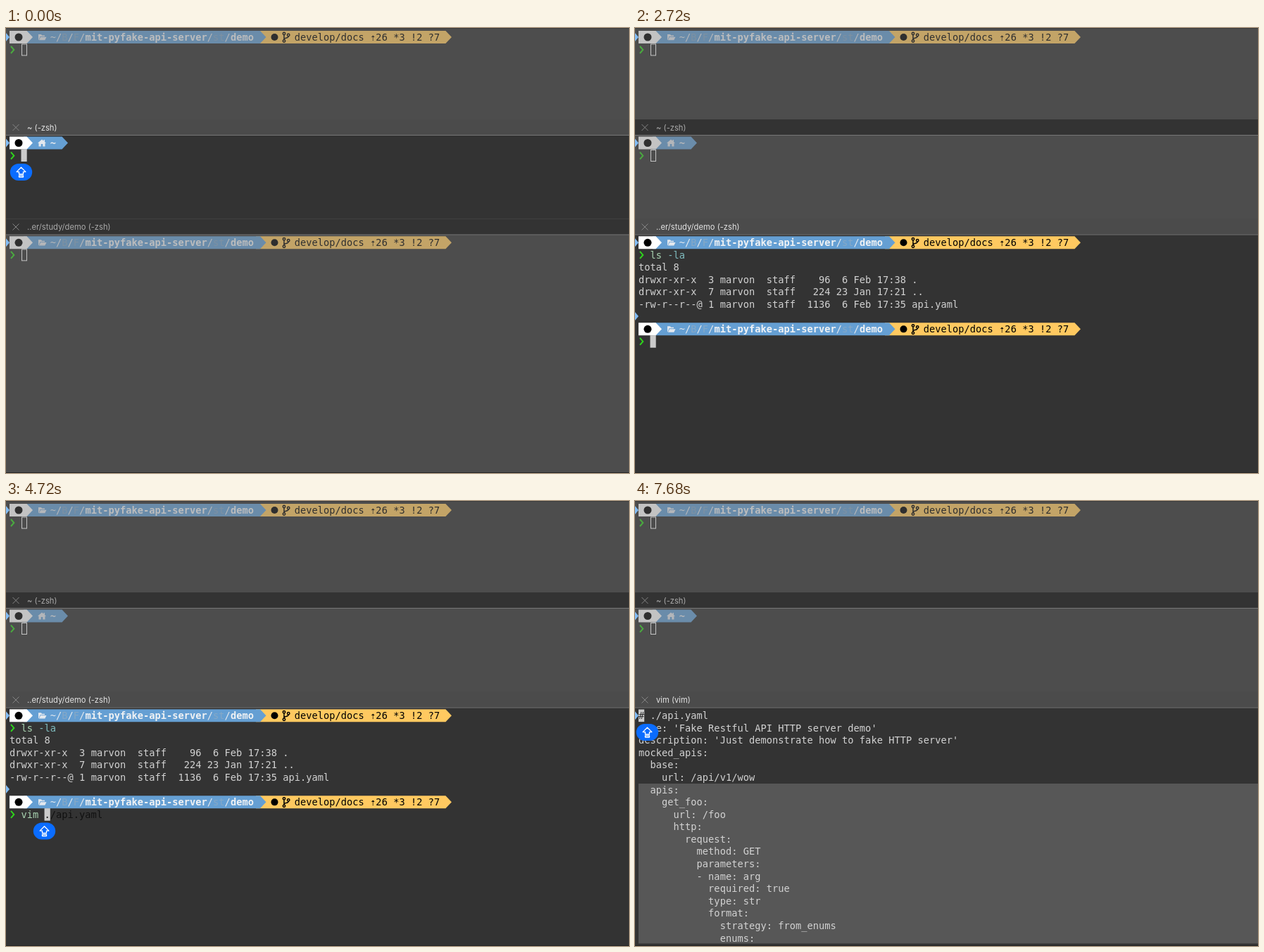
An HTML page for the animation above (8000 ms loop, 885 px wide and 633 px high).

```html
<!DOCTYPE html>
<html lang="en">
<head>
<meta charset="utf-8">
<title>Terminal panes</title>
<style>
  html, body { margin: 0; width: 100%; height: 100%; overflow: hidden; background: #333; }
  svg { display: block; width: 100vw; height: 100vh; }
  text { white-space: pre; font: 13.72px "DejaVu Sans Mono", monospace; fill: #d2d2d2; }
  text.title { font: 11.2px Inter, sans-serif; }
  text.bold { font-weight: 700; }
</style>
</head>
<body>
<svg id="stage" viewBox="0 0 885 633" preserveAspectRatio="none"></svg>
<script>
const LOOP = 8000, STEP = 80;
const CELL = 8.26, LEFT = 5, LINE = 17.58, TOP = 305.3;
const stage = document.getElementById('stage');

const col = n => LEFT + n * CELL;
const row = n => TOP + n * LINE;

function add(parent, tag, attrs = {}, content) {
  const node = document.createElementNS('http://www.w3.org/2000/svg', tag);
  for (const key in attrs) node.setAttribute(key, attrs[key]);
  if (content !== undefined) node.textContent = content;
  return parent.appendChild(node);
}
const group = (parent = stage) => add(parent, 'g');
const rect = (parent, x, y, width, height, fill, more) =>
  add(parent, 'rect', { x, y, width, height, fill, ...more });
const path = (parent, d, fill, more) => add(parent, 'path', { d, fill, ...more });
const dot = (parent, cx, cy, r, more) => add(parent, 'circle', { cx, cy, r, ...more });
const show = (node, on) => { node.style.display = on ? '' : 'none'; };
const move = (node, x, y) => node.setAttribute('transform', `translate(${x} ${y})`);

function write(parent, column, y, content, fill = '#d2d2d2', cls = '') {
  return add(parent, 'text', { x: col(column), y: y + 4.8, class: cls, style: `fill:${fill}` }, content);
}

const arrowBar = (parent, from, to, fill) =>
  path(parent, `M${from}-9H${to}L${to + 8.5} 0L${to} 9H${from}Z`, fill);

const folder = parent => path(parent,
  'M46 4V-4H50L51 -2.5H55V-1H48.5L46.5 4ZM49-.2H57.5L55.3 4.3H47Z', '#e3e8ee');
const house = parent => path(parent,
  'M45 .2L51 -5L53.5 -2.8V-4.5H55V-1.5L57 .2H55.5V5H52.3V1.5H49.7V5H46.5V.2Z', '#e3e8ee');

function branch(parent) {
  const line = { stroke: '#000', 'stroke-width': 1.5 };
  for (const [x, y] of [[395, -5], [395, 5.5], [401.2, -3]]) dot(parent, x, y, 1.7, { fill: 'none', ...line });
  path(parent, 'M395-3V3.7M401.2-1.2C401.2 2 395 .5 395 3', 'none', line);
}

const mark = y => path(stage, `M0 ${y - 6}L5 ${y}L0 ${y + 6}Z`, '#82bcf4');

function prompt(parent, y, home) {
  const g = group(parent);
  move(g, 0, y);
  if (!home) arrowBar(g, 355, 624.5, '#ffc960');
  arrowBar(g, 25, home ? 79.5 : 361, '#659fd3');
  arrowBar(g, 5, 29.5, '#fff');
  dot(g, 18, 0, 5.5, { fill: '#000' });
  if (home) {
    house(g);
    write(g, 7, 0, '~', '#e3e8ee', 'bold');
  } else {
    const light = '#e3e8ee', faded = '#86a8c6';
    folder(g);
    const parts = [['~/', light], ['B', faded], ['/', light], ['F', faded], ['/', light],
      ['mit-pyfake-api-server', '#f0f2f4', 'bold'], ['/', light], ['st', faded], ['/', light],
      ['demo', '#f0f2f4', 'bold']];
    let at = 7;
    for (const [content, fill, cls] of parts) {
      write(g, at, 0, content, fill, cls);
      at += content.length;
    }
    dot(g, 381.5, 0, 5, { fill: '#000' });
    branch(g);
    write(g, 49, 0, 'develop/docs ⇡26 *3 !2 ?7', '#000');
  }
  return g;
}

const chevron = (parent, y) => path(parent, `M7 ${y - 5}L11.3 ${y}L7 ${y + 5}`, 'none',
  { stroke: '#2fd41c', 'stroke-width': 2 });
const block = parent => rect(parent, 0, -8.8, 8.2, 17.6, '#cbcbcb');
const hollow = (parent, y) => rect(parent, 22.5, y - 8, 7, 16, 'none', { stroke: '#c4c4c4' });
const dim = (parent, y, height) => rect(parent, 0, y, 885, height, '#717171', { 'fill-opacity': .42 });

function titleBar(y) {
  const bar = rect(stage, 0, y - 11.5, 885, 22, '#333');
  rect(stage, 0, y + 10.5, 885, 1, '#777');
  path(stage, `M9.5 ${y - 4.5}l9 9m0-9l-9 9`, 'none', { stroke: '#858585' });
  const label = add(stage, 'text', { class: 'title', x: 30, y: y + 4 });
  return (content, active) => {
    bar.setAttribute('fill', active ? '#4b4b4b' : '#333');
    label.style.fill = active ? '#e4e4e4' : '#aaa';
    label.textContent = content;
  };
}

// Upper pane
rect(stage, 0, 0, 885, 633, '#333');
prompt(stage, 13);
chevron(stage, 31);
dim(stage, 1, 129);
hollow(stage, 31);
mark(13);

// Middle pane
prompt(stage, 163.5, true);
chevron(stage, 181.7);
const homeBlock = block(stage);
move(homeBlock, 21.5, 181.2);
const homeIdle = group();
dim(homeIdle, 153, 118);
hollow(homeIdle, 181.5);
mark(163.5);
rect(stage, 0, 271, 885, 1, '#4d4d4d');
const setHomeTitle = titleBar(141.5);
const setDemoTitle = titleBar(283);

// Lower pane: shell
const shell = group();
prompt(shell, row(0));
chevron(shell, row(1));

function entry(parent, y, command) {
  const typed = write(parent, 2, y, '', '#a9d3b1');
  const option = write(parent, 2 + command.length, y, '', '#7fbcbf');
  return content => {
    typed.textContent = content.slice(0, command.length);
    option.textContent = content.slice(command.length);
  };
}
const setList = entry(shell, row(1), 'ls');

const listing = group(shell);
[
  'total 8',
  'drwxr-xr-x  3 marvon  staff    96  6 Feb 17:38 .',
  'drwxr-xr-x  7 marvon  staff   224 23 Jan 17:21 ..',
  '-rw-r--r--@ 1 marvon  staff  1136  6 Feb 17:35 api.yaml'
].forEach((line, i) => write(listing, 0, row(i + 2), line));
prompt(listing, row(7));
chevron(listing, row(8));
const setEdit = entry(listing, row(8), 'vim ./api.yaml');

const shellBlock = block(shell);
const hint = write(shell, 2, row(8), '', '#111');

// Lower pane: editor
const editor = group();
const selection = rect(editor, 5, row(6) - 8.8, 880, 0, '#575757');
move(block(editor), 5, row(0));
write(editor, 0, row(0), '#', '#333');
[
  '  ./api.yaml',
  "name: 'Fake Restful API HTTP server demo'",
  "description: 'Just demonstrate how to fake HTTP server'",
  'mocked_apis:',
  '  base:',
  '    url: /api/v1/wow',
  '  apis:',
  '    get_foo:',
  '      url: /foo',
  '      http:',
  '        request:',
  '          method: GET',
  '          parameters:',
  '          - name: arg',
  '            required: true',
  '            type: str',
  '            format:',
  '              strategy: from_enums',
  '              enums:'
].forEach((line, i) => write(editor, 0, row(i), line));

const demoIdle = group();
dim(demoIdle, 294, 338);
hollow(demoIdle, row(1));
mark(row(0));
const entryMark = mark(row(6) - .8);
rect(stage, 0, 0, 885, 1, '#3a3a3a');
rect(stage, 0, 632, 885, 1, '#252525');

// Caps lock badge and pointer
const badge = group();
rect(badge, -15.7, -12, 31.4, 24, '#0a6cff', { rx: 12 });
path(badge, 'M0-6.8L6.4-.4H3V3H-3V-.4H-6.4ZM-3 4.8H3V7H-3Z', 'none',
  { stroke: '#fff', 'stroke-width': 1.3, 'stroke-linejoin': 'round' });
const pointer = path(stage, 'M0 0V16L3.8 12.7L6.4 18.8L9 17.7L6.5 11.8H11.5Z', '#000',
  { stroke: '#fff', 'stroke-width': 1.2 });

const pointerRuns = [
  { end: 640, points: [[80, 589, 478], [240, 579, 470]] },
  { end: 3920, points: [[2880, 560, 480], [3360, 526, 506], [3840, 505, 545]] },
  { end: 7200, points: [[5520, 388, 498], [5760, 156, 392], [5840, 156, 392], [6320, 3, 412],
    [6560, 2, 412], [6720, 2, 477], [7040, 2, 606]] }
];
const badges = [[0, 160, 21.5, 205], [4720, 4960, 54.5, 469.5], [4960, 5520, 17.5, 329], [7200, LOOP, 17.5, 329]];
const LIST = 'ls -la', EDIT = 'vim ./api.yaml';
const listKeys = [720, 800, 880, 1040, 1120, 1200], editKeys = [4000, 4080, 4160, 4320];
const FOCUS = 400, OUTPUT = 1360, ACCEPT = 4800, OPEN = 4960;

const pressed = (keys, t) => keys.filter(k => k <= t).length;

function along(points, t) {
  const next = points.findIndex(p => p[0] > t);
  if (next < 0) return points[points.length - 1].slice(1);
  const [t0, x0, y0] = points[next - 1], [t1, x1, y1] = points[next];
  const k = (t - t0) / (t1 - t0);
  return [x0 + (x1 - x0) * k, y0 + (y1 - y0) * k];
}

function selectedRows(t) {
  if (t < 6640) return 0;
  if (t <= 6720) return (t - 6560) / STEP;
  return Math.min(13, 2 + Math.ceil((t - 6720) / STEP * 2.75));
}

function render(t) {
  const focused = t >= FOCUS, listed = t >= OUTPUT, open = t >= OPEN;
  show(homeBlock, !focused);
  show(homeIdle, focused);
  show(demoIdle, !focused);
  setHomeTitle('~ (-zsh)', !focused);
  setDemoTitle(open ? 'vim (vim)' : '..er/study/demo (-zsh)', focused);

  show(shell, !open);
  show(editor, open);
  show(listing, listed);
  show(entryMark, listed && !open);
  const listCount = pressed(listKeys, t);
  const editCount = t >= ACCEPT ? EDIT.length : pressed(editKeys, t);
  setList(LIST.slice(0, listCount));
  setEdit(EDIT.slice(0, editCount));
  hint.textContent = editCount ? EDIT.slice(editCount) : '';
  hint.setAttribute('x', col(2 + editCount));
  show(shellBlock, focused);
  move(shellBlock, col(2 + (listed ? editCount : listCount)), row(listed ? 8 : 1));
  selection.setAttribute('height', Math.min(selectedRows(t) * LINE, 227.5));

  const tag = badges.find(([from, to]) => t >= from && t < to);
  show(badge, tag);
  if (tag) move(badge, tag[2], tag[3]);
  const run = pointerRuns.find(r => t >= r.points[0][0] && t < r.end);
  show(pointer, run);
  if (run) move(pointer, ...along(run.points, t));
}

const start = performance.now();
function tick() {
  const t = (performance.now() - start) % LOOP;
  render(Math.floor(t / STEP) * STEP);
  requestAnimationFrame(tick);
}
tick();
</script>
</body>
</html>
```
